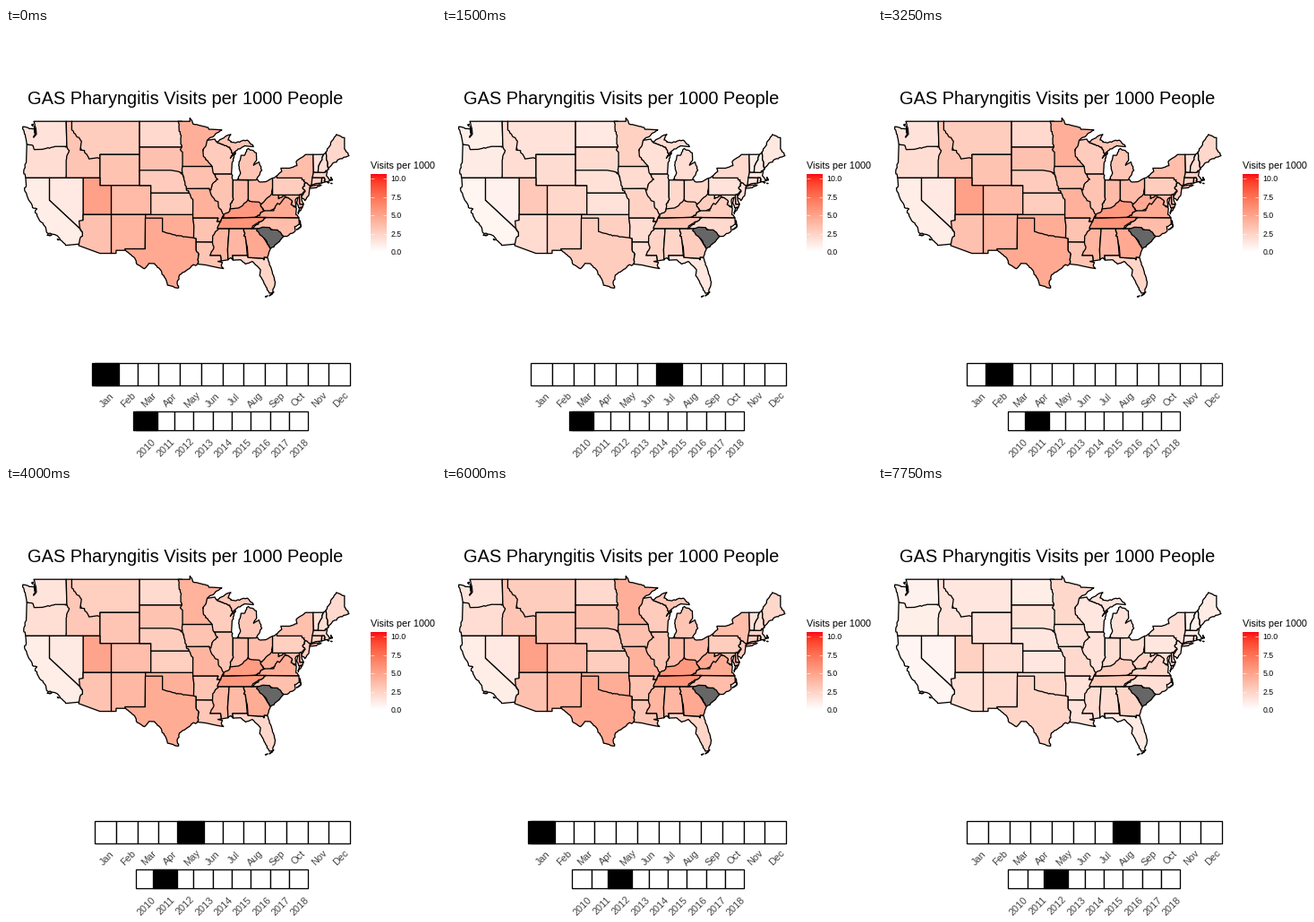
A matplotlib script that plays this animation: 480x480 px, repeating every 8000 ms.

```python
import numpy as np
import matplotlib.pyplot as plt
from matplotlib.animation import FuncAnimation
from matplotlib.patches import Polygon, Rectangle

plt.rcParams["font.family"] = "Liberation Sans"
PX = 0.72  # points per pixel at 100 dpi
LINE = 1.3 * PX
MAX_RATE = 10.58

fig = plt.figure(figsize=(4.8, 4.8), dpi=100, facecolor="white")
ax = fig.add_axes([0, 0, 1, 1])
ax.axis("off")


def white_red(t):
    """White to red, blended in Lab space."""
    t = np.clip(np.atleast_1d(t), 0, 1)[:, None]
    lab = np.array([100, 0, 0]) * (1 - t) + np.array([53.24, 80.09, 63]) * t
    fy = (lab[:, 0] + 16) / 116
    f = np.stack([fy + lab[:, 1] / 500, fy, fy - lab[:, 2] / 200], axis=1)
    xyz = np.where(f > 6 / 29, f ** 3, (f - 4 / 29) * 0.12842) * [0.9505, 1, 1.089]
    m = np.array([[3.2406, -1.5372, -0.4986],
                  [-0.9689, 1.8758, 0.0415],
                  [0.0557, -0.2040, 1.0570]])
    rgb = np.clip(xyz @ m.T, 0, 1)
    return np.where(rgb > 0.0031308, 1.055 * rgb ** (1 / 2.4) - 0.055, 12.92 * rgb)


def season(month):
    """Visits stay level most of the year and dip in late summer."""
    return 1.1 - 0.57 * np.exp(-(((month % 12) - 6.8) / 1.7) ** 2)


def project(coords):
    """Mercator: west longitude, latitude pairs to pixels."""
    west, lat = np.reshape(coords, (-1, 2)).T
    merc = np.degrees(np.arcsinh(np.tan(np.radians(lat))))
    return np.column_stack([18.8 + (124.7 - west) * 6.31,
                            104.2 + (56.37 - merc) * 6.31])


def wiggle(p, q):
    """Points from p up to q, rough along rivers and coasts.

    The seed ignores direction, so neighbours share the same border.
    """
    a, b = sorted([tuple(p), tuple(q)])
    step = np.subtract(b, a)
    size = np.hypot(*step)
    if np.abs(step).min() < 1.5 or size > 22:
        return [p]
    n = int(size / 2.2)
    rng = np.random.default_rng(int(100 * np.sum([a, b])))
    t = np.arange(1, n + 1)[:, None] / (n + 1)
    mids = a + step * t + rng.normal(0, 0.4, (n, 2))
    return [p, *(mids if a == tuple(p) else mids[::-1])]


states = []


def state(name, rate, *rings):
    """Later states cover the loose edges of earlier ones."""
    for ring in rings:
        pts = project(ring)
        path = [v for p, q in zip(pts, np.roll(pts, -1, axis=0)) for v in wiggle(p, q)]
        patch = Polygon(path, closed=True, fc="#666666", ec="black", lw=LINE,
                        joinstyle="round", snap=False)
        ax.add_patch(patch)
        if rate:
            states.append((patch, rate))


def box(name, rate, west, east, south, north):
    state(name, rate, [west, north, east, north, east, south, west, south])


# West
state("OR", 1.7, [124, 46.25, 124.1, 44, 124.55, 42.85, 124.2, 42, 117.03, 42, 116.4, 46,
                  119, 46.2])
state("WA", 1.4, [117.03, 49, 122.76, 49, 122.4, 48.2, 122.3, 47.5, 122.8, 47.1, 122.5, 47.5,
                  122.7, 48.1, 123.2, 48.15, 124.7, 48.38, 124.15, 46.95, 124, 46.3,
                  122.9, 46.1, 122.7, 45.62, 121.2, 45.65, 119, 46, 116.92, 46],
      [123.15, 48.6, 122.85, 48.68, 122.95, 48.45],
      [122.7, 48.4, 122.4, 47.95, 122.6, 47.6])
state("MT", 2.5, [116.05, 49, 104.05, 49, 104.05, 45, 111.05, 45, 111.05, 44.4, 113.5, 44.3,
                  114.9, 46.3, 116.05, 47.3])
state("ID", 2.9, [117.03, 49, 116.05, 49, 116.05, 48, 114.33, 46.65, 114.55, 45.56,
                  113.8, 45.5, 113, 44.45, 111.5, 44.6, 111.05, 44.48, 111.05, 42,
                  117.03, 42, 117.03, 44.3, 116.5, 45.5, 116.92, 46])
box("WY", 3.0, 111.05, 104.05, 41, 45)
state("UT", 4.7, [114.04, 42, 111.05, 42, 111.05, 41, 109.05, 41, 109.05, 37, 114.04, 37])
box("CO", 3.4, 109.05, 102.05, 37, 41)
state("NV", 1.1, [120, 42, 114.04, 42, 114.04, 36, 114.63, 35, 120, 39])
state("CA", 0.9, [124.2, 42, 120, 42, 120, 39, 114.63, 35, 114, 34.3, 114.72, 32.72,
                  117.12, 32.53, 118.4, 33.75, 119.2, 34.15, 120.5, 34.45, 120.65, 35.15,
                  121.9, 36.4, 122.5, 37.5, 122.2, 37.8, 123, 38, 123.8, 39.3,
                  124.4, 40.45, 124.1, 41],
      [120.4, 34.05, 119.6, 34.05, 119.9, 33.95], [118.6, 33.47, 118.3, 33.33, 118.5, 33.35])
state("AZ", 3.1, [114.04, 37, 109.05, 37, 109.05, 31.33, 111.07, 31.33, 114.82, 32.5,
                  114.6, 33.5, 114.15, 34.27, 114.63, 35.1, 114.75, 36.1, 114.04, 36.2])
state("NM", 3.7, [109.05, 37, 103, 37, 103.06, 32, 106.62, 32, 106.53, 31.78, 108.2, 31.78,
                  108.2, 31.33, 109.05, 31.33])

# Plains
state("OK", 4.1, [103, 37, 94.62, 37, 94.43, 35.4, 94.48, 33.2, 100.2, 33.5, 100.3, 36.3,
                  103, 36.3])
state("TX", 4.3, [103.04, 36.5, 100, 36.5, 100, 34.57, 98.1, 34.1, 96, 33.8, 94.48, 33.64,
                  94.04, 33.55, 94.04, 32, 93.55, 31.2, 93.8, 29.7, 94.75, 29.45, 95, 29.2,
                  97, 28, 97.4, 26.9, 97.15, 25.96, 99.1, 26.4, 99.5, 27.5, 100.65, 29.1,
                  101.4, 29.77, 102.4, 29.8, 103.2, 28.98, 104.5, 29.65, 104.9, 30.6,
                  106.53, 31.78, 106.62, 32, 103.06, 32])
box("KS", 2.5, 102.05, 94.62, 37, 40)
box("SD", 3.1, 104.05, 96.3, 42.7, 45.94)
state("NE", 2.6, [104.05, 43, 98.5, 43, 97.3, 42.85, 96.45, 42.49, 95.3, 40, 102.05, 40,
                  102.05, 41, 104.05, 41])
box("ND", 1.9, 104.05, 96.56, 45.94, 49)

# Great Lakes
state("WI", 2.6, [92.1, 46.75, 90.75, 46.9, 90.4, 46.55, 88.1, 45.9, 87.6, 45.1, 88, 44.55,
                  87.05, 45.25, 87.7, 43.75, 87.8, 42.5, 90.65, 42.5, 91.5, 42.9, 92, 44,
                  93, 45, 92.6, 46.5])
state("MI", 2.9, [90.4, 46.55, 88.4, 47.38, 87.9, 47.45, 88.4, 46.8, 87.4, 46.5, 85, 46.77,
                  83.9, 45.97, 85.5, 46.08, 86.6, 45.7, 87.6, 45.1, 88.1, 45.9],
      [84.8, 45.75, 83.4, 45.2, 83.35, 44.3, 83.9, 43.65, 82.95, 44.07, 82.42, 43,
       83.45, 41.73, 86.82, 41.76, 86.2, 42.7, 86.53, 43.65, 86.1, 44.9, 85.5, 44.9,
       85.1, 45.6])
state("IL", 3.0, [90.65, 42.5, 87.8, 42.5, 87.53, 41.72, 87.53, 39.35, 87.95, 38.2, 88, 37.2,
                  89.15, 36.9, 90, 37.4, 91, 39, 91.8, 40, 90.9, 42])
state("IN", 3.4, [87.53, 41.72, 84.82, 41.7, 84.82, 38.7, 86.5, 37.5, 88.05, 37.6,
                  87.95, 38.2, 87.53, 39.35])
state("OH", 3.4, [84.82, 41.7, 83.45, 41.73, 82.7, 41.45, 81.7, 41.5, 80.52, 41.98,
                  80.52, 40, 81.6, 38.6, 83, 38.4, 84.82, 38.9])
state("MD", 3.4, [79.48, 39.72, 75.79, 39.72, 75.7, 38.46, 75.05, 38.45, 75.25, 38.03,
                  75.9, 37.95, 76.2, 38.8, 76, 39.4, 76.5, 39, 76.35, 38.1, 77.25, 38.4,
                  77.05, 38.85, 78.4, 39.3, 79.48, 39.1])
state("MO", 3.9, [95.77, 40.58, 91.72, 40.6, 91.5, 40, 90.7, 38.95, 90.15, 38.8, 90.1, 38.1,
                  89.15, 36.98, 89.5, 36.5, 89.7, 36, 90.37, 36, 90.15, 36.5, 94.62, 36.5,
                  94.61, 39.1, 95.3, 40])
state("IA", 3.1, [96.45, 43.5, 91.22, 43.5, 91.05, 42.7, 90.2, 41.8, 91.05, 41.3,
                  91.42, 40.38, 91.72, 40.6, 95.77, 40.58, 96.45, 42.49, 96.55, 43.1])
state("MN", 4.0, [97.23, 49, 95.15, 49, 95.15, 49.38, 94.6, 48.7, 92.5, 48.4, 91.4, 48.07,
                  89.5, 48, 92.1, 46.75, 92.3, 46.1, 92.85, 45.6, 92.75, 44.75, 91.22, 43.5,
                  96.45, 43.5, 96.45, 45.3, 96.85, 45.6, 96.56, 45.94, 96.85, 47.5])

# South
state("MS", 3.7, [90.3, 35, 88.2, 35, 88.47, 31.9, 88.4, 30.35, 89.6, 30.18, 89.73, 31,
                  91.8, 31, 91.3, 34])
state("AR", 3.0, [94.62, 36.5, 90.15, 36.5, 90.37, 36, 89.7, 36, 90.07, 35.1, 91.1, 33.95,
                  91.15, 33, 94.04, 33.02, 94.04, 33.55, 94.48, 33.64, 94.43, 35.4])
state("LA", 2.9, [94.04, 33.02, 91.17, 33, 90.9, 32.3, 91.6, 31, 89.73, 31, 89.6, 30.18,
                  90.2, 30.1, 89.4, 29.95, 89.6, 29.5, 89.2, 29, 90.2, 29.15, 91.3, 29.35,
                  92.3, 29.55, 93.8, 29.7, 93.55, 31.2, 94.04, 32])
state("AL", 3.6, [88.2, 35, 85.6, 35, 85.18, 32.87, 85, 31, 87.6, 31, 87.5, 30.3,
                  87.9, 30.65, 88.4, 30.35, 88.47, 31.9])
state("FL", 2.1, [87.6, 31, 85, 31, 84.86, 30.7, 82.2, 30.57, 82.05, 30.36, 82, 30.75,
                  81.45, 30.7, 80.55, 28.45, 80.05, 26.9, 80.4, 25.2, 81.1, 25.12,
                  81.85, 26.45, 82.8, 27.9, 82.65, 28.8, 84.1, 30.1, 85.3, 29.7,
                  86.2, 30.35, 87.5, 30.3],
      [80.3, 25.3, 81.1, 24.7, 80.6, 24.95], [81.4, 24.7, 81.8, 24.55, 81.5, 24.62])
state("GA", 4.3, [85.6, 35, 83.1, 35, 80.9, 32.03, 81.45, 30.7, 82, 30.75, 82.05, 30.36,
                  82.2, 30.57, 84.86, 30.7, 85, 32.3, 85.18, 32.87])
state("NC", 3.3, [84.3, 35, 82.6, 36, 81.68, 36.59, 75.87, 36.55, 75.8, 35.6, 76.6, 35.3,
                  76.5, 34.65, 77.95, 33.87, 78.55, 33.86, 79.8, 34.6, 81.1, 35, 83.1, 35],
      [75.75, 36.2, 75.5, 35.25, 76.3, 34.85, 75.55, 35.3])
state("SC", None, [83.1, 35, 82.3, 35.2, 81.05, 35.15, 80.8, 34.82, 79.67, 34.8,
                   78.55, 33.86, 79.3, 33.1, 80.9, 32.03, 81.5, 33, 83.35, 34.7])
state("WV", 4.3, [80.52, 40.63, 80.52, 39.72, 79.48, 39.72, 79.48, 39.2, 78.4, 39.6,
                  77.75, 39.33, 79.5, 38.2, 81.7, 37, 82.6, 38.15, 82.6, 38.42, 81.75, 39.1,
                  80.85, 39.7])
state("VA", 4.2, [83.68, 36.6, 75.87, 36.55, 76.4, 37, 76.3, 37.9, 77.25, 38.4, 77.05, 38.85,
                  77.75, 39.33, 78.35, 39.4, 79.3, 38.42, 79.65, 38.58, 80.3, 37.55,
                  81.97, 37.54],
      [75.25, 38.03, 75.97, 37.12, 75.7, 37.93])
state("KY", 5.1, [89.15, 37, 88.1, 37.5, 88.05, 37.8, 86.5, 37.93, 85.8, 38.28, 84.85, 39.1,
                  84.2, 38.8, 82.9, 38.75, 82.6, 38.15, 81.97, 37.54, 83.68, 36.6,
                  89.42, 36.5])
state("TN", 5.3, [89.5, 36.5, 88.07, 36.5, 83.68, 36.6, 81.68, 36.59, 82.6, 36, 84, 35.4,
                  84.3, 35, 90.3, 35, 89.7, 36])

# Northeast
state("NY", 3.3, [79.76, 42.27, 78.9, 42.85, 79.05, 43.27, 77.5, 43.27, 76.2, 43.6,
                  76.35, 44.1, 74.7, 45, 73.35, 45, 73.27, 42.75, 73.5, 41.25, 74, 40.7,
                  74.7, 41.36, 75.3, 41.8, 79.76, 41.8],
      [74, 40.6, 73.7, 40.87, 72.3, 41.13, 71.9, 41.05, 72.8, 40.7])
state("PA", 2.5, [80.52, 41.98, 79.76, 42.27, 79.76, 42, 75.35, 42, 74.7, 41.36, 75.2, 40.65,
                  74.75, 40.2, 75.45, 39.82, 75.79, 39.72, 80.52, 39.72])
state("NJ", 2.5, [74.7, 41.36, 73.9, 41, 74.1, 39.75, 74.8, 38.95, 75.5, 39.5, 74.75, 40.2,
                  75.2, 40.65])
state("DE", 2.8, [75.79, 39.72, 75.45, 39.82, 75.35, 39, 75.05, 38.45, 75.7, 38.46])
state("CT", 2.3, [73.5, 42.05, 71.8, 42.02, 71.85, 41.32, 72.9, 41.25, 73.65, 41])
state("MA", 2.2, [73.27, 42.75, 71.3, 42.7, 70.85, 42.88, 71, 42.3, 70.5, 41.77, 70, 41.8,
                  70.2, 42.08, 69.95, 41.7, 71.12, 41.5, 71.38, 42.02, 73.5, 42.05],
      [70.8, 41.4, 70.5, 41.38, 70.65, 41.35], [70.2, 41.3, 69.98, 41.27, 70.1, 41.25])
state("RI", 2.8, [71.8, 42.02, 71.38, 42.02, 71.12, 41.5, 71.85, 41.32])
state("VT", 1.5, [73.35, 45, 71.5, 45.01, 72.4, 43.5, 72.46, 42.73, 73.27, 42.75])
state("NH", 1.7, [71.5, 45.01, 71.08, 45.3, 70.7, 43.08, 71.3, 42.7, 72.46, 42.73, 72.4, 43.5])
state("ME", 2.0, [71.08, 45.3, 70.25, 46.2, 70, 46.7, 69.23, 47.46, 67.8, 47.07, 67.8, 45.7,
                  67, 44.85, 68.8, 44.4, 70, 43.75, 70.7, 43.08])


def label(x, y, s, size, color="black", **kw):
    ax.text(x, y, s, fontsize=size * PX, color=color, **kw)


def timeline(x0, x1, y0, y1, names, label_y, grow):
    """Row of boxes with slanted labels; returns a function that marks one box."""
    w = (x1 - x0) / len(names)
    for i, name in enumerate(names):
        ax.add_patch(Rectangle((x0 + i * w, y0), w, y1 - y0, fc="white", ec="black",
                               lw=LINE, zorder=2))
        label(x0 + (i + 0.5) * w + 1.6, label_y, name, 11, "#444444",
              rotation=45, ha="center", va="center")
    mark = ax.add_patch(Rectangle((x0 - grow, y0), w + 2 * grow, y1 - y0, fc="black",
                                  ec="black", lw=LINE, zorder=3))
    return lambda i: mark.set_x(x0 + i * w - grow)


label(24.5, 85, "GAS Pharyngitis Visits per 1000 People", 19.95)
label(407, 157, "Visits per 1000", 10.9)

BAR_L, BAR_R, BAR_T, BAR_B = 407, 424.5, 163.5, 250
ramp = white_red(np.linspace(1, 0, 87))[:, None, :]
ax.imshow(ramp, extent=(BAR_L, BAR_R, BAR_B, BAR_T), aspect="auto",
          interpolation="bilinear", zorder=2)
for v in np.arange(0, 10.1, 2.5):
    y = BAR_B - (BAR_B - BAR_T) * v / MAX_RATE
    for x in (BAR_L, BAR_R - 3.5):
        ax.plot([x, x + 3.5], [y, y], color="white", lw=0.6 * PX, zorder=3,
                solid_capstyle="butt")
    label(429.5, y + 3.2, f"{v:.1f}", 8.8)

MONTHS = "Jan Feb Mar Apr May Jun Jul Aug Sep Oct Nov Dec".split()
mark_month = timeline(99.2, 384, 374.4, 398.8, MONTHS, 415.3, 3)
mark_year = timeline(145.2, 337.4, 427.8, 449, range(2010, 2019), 468.8, 2.8)

ax.set_xlim(0, 480)
ax.set_ylim(480, 0)


def draw(month):
    rates = np.array([rate for _, rate in states]) * season(month)
    for (patch, _), color in zip(states, white_red(rates / MAX_RATE)):
        patch.set_facecolor(color)
    mark_month(month % 12)
    mark_year(month // 12)
    return []


anim = FuncAnimation(fig, draw, frames=32, interval=250, repeat=True)
plt.show()
```
